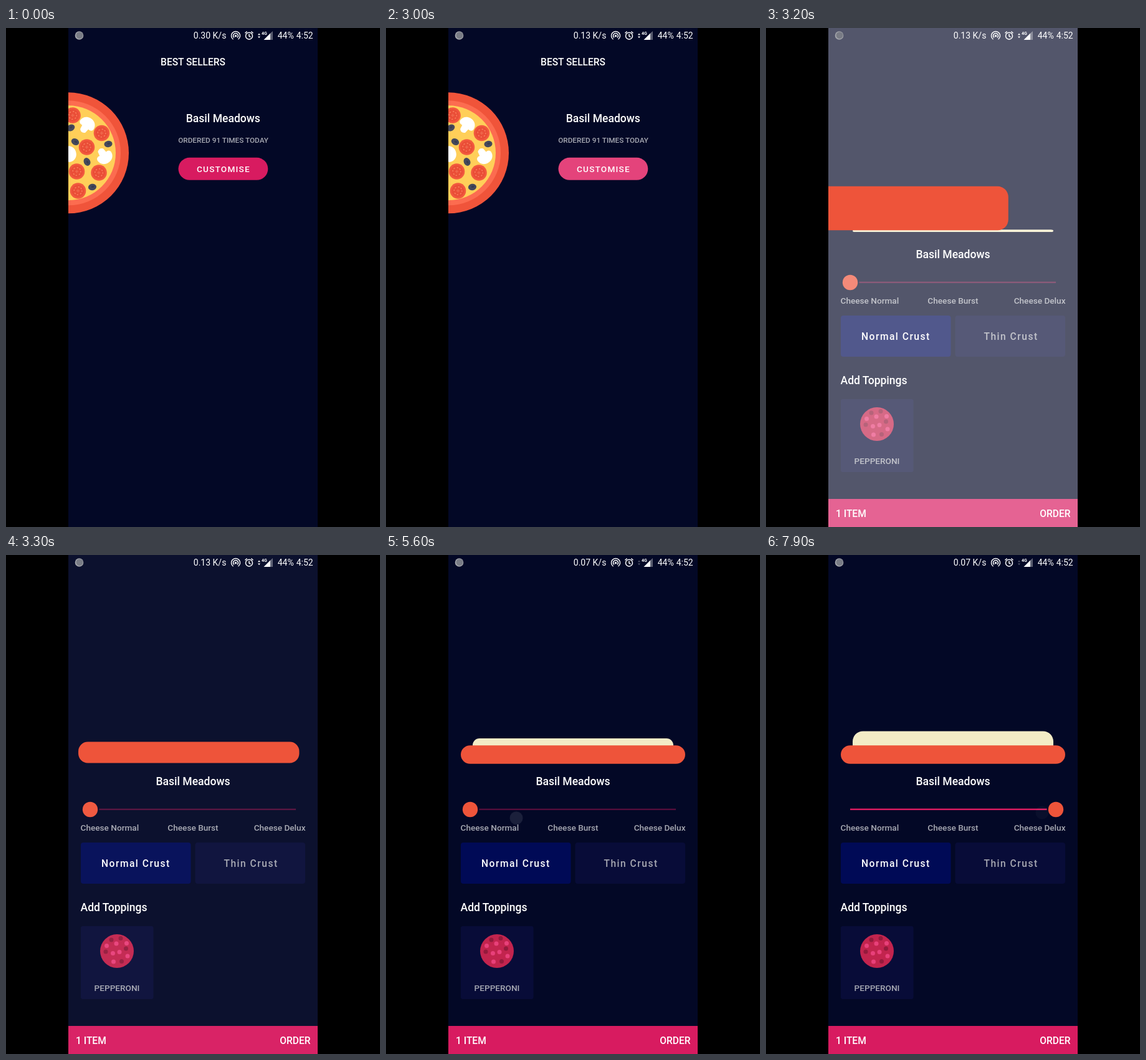
Animation, 600 px wide and 800 px high, one loop 8 s. Source, as an HTML page:

```html
<!DOCTYPE html>
<html lang="en">
<head>
<meta charset="utf-8">
<title>Pizza order</title>
<style>
html, body { margin: 0; width: 100%; height: 100%; overflow: hidden; background: #000; }
svg { display: block; }
text { font: 500 15.57px Roboto, sans-serif; fill: #fff; }
.status text { font-size: 14px; font-weight: 400; }
.status .net { font-size: 7px; font-weight: 700; }
.title { font-size: 17.52px; }
.small { font-size: 13.62px; }
.note { font-size: 11.8px; }
.dim { fill: #a6a8b2; }
.spaced { letter-spacing: 1.5px; }
.mid { text-anchor: middle; }
.end { text-anchor: end; }

.loop, .status .loop { animation: 8s linear infinite; }
.status .rate1 { animation-name: rate1; animation-timing-function: step-end; }
.status .rate2 { animation-name: rate2; animation-timing-function: step-end; }
.status .rate3 { animation-name: rate3; animation-timing-function: step-end; }
.status .arrows { animation-name: arrows; animation-timing-function: step-end; }
.list { animation-name: list; animation-timing-function: step-end; }
.detail { animation-name: detail; animation-timing-function: step-end; }
.press { animation-name: press; }
.scrim { animation-name: scrim; }
.cheese { animation-name: cheese; }
.active { animation-name: active; }
.knob { animation-name: knob; }
.touch { animation-name: touch; }
.crust { animation: crust 8s infinite, crustTop 8s infinite, detail 8s step-end infinite; }

@keyframes rate1 { 0% { opacity: 1 } 32.5%, 100% { opacity: 0 } }
@keyframes rate2 { 0% { opacity: 0 } 32.5% { opacity: 1 } 70%, 100% { opacity: 0 } }
@keyframes rate3 { 0% { opacity: 0 } 70%, 100% { opacity: 1 } }
@keyframes arrows { 0% { opacity: 1 } 20% { opacity: .3 } 32.5% { opacity: 1 } 70%, 100% { opacity: .3 } }

@keyframes list { 0% { opacity: 1 } 38.375%, 100% { opacity: 0 } }
@keyframes detail { 0% { opacity: 0 } 38.375%, 100% { opacity: 1 } }
@keyframes press { 0%, 35% { fill: #d81b60 } 36.875%, 100% { fill: #e4437b } }
@keyframes scrim {
  0%, 38.37% { opacity: 0 }
  38.375% { opacity: 1; animation-timing-function: cubic-bezier(.4, 0, .2, 1) }
  42.125%, 100% { opacity: 0 }
}

/* the round pizza box flattens into the side view of the crust */
@keyframes crust {
  0%, 38.375% { x: 3px; width: 194px; rx: 22px; animation-timing-function: cubic-bezier(.41, 0, .2, 1) }
  42.125%, 100% { x: 120px; width: 360px; rx: 15px }
}
@keyframes crustTop {
  0%, 38.375% { y: 99px; height: 194px; animation-timing-function: cubic-bezier(.34, .08, .16, 1) }
  42.125%, 100% { y: 305.3px; height: 29.4px }
}
@keyframes cheese {
  0%, 39.7% { y: 327px; height: 0; rx: 3px }
  42.5%, 70.625% { y: 294px; height: 33px; rx: 11px }
  74.375%, 95% { y: 287px; height: 40px; rx: 14px }
  98.75%, 100% { y: 282.5px; height: 44.5px; rx: 16.5px }
}

@keyframes active {
  0%, 70.625% { width: 0; animation-timing-function: ease-in-out }
  72.5%, 94.75% { width: 165px; animation-timing-function: ease-in-out }
  96.625%, 100% { width: 330px }
}
@keyframes knob {
  0%, 70.625% { transform: translateX(0); animation-timing-function: ease-in-out }
  72.5%, 94.75% { transform: translateX(165px); animation-timing-function: ease-in-out }
  96.625%, 100% { transform: translateX(330px) }
}
@keyframes touch {
  0%, 64.99% { opacity: 0; transform: translate(135px, 415px) }
  65% { opacity: .1; transform: translate(135px, 415px) }
  74.75% { opacity: .1; transform: translate(279px, 428px) }
  76.25% { opacity: 0; transform: translate(279px, 428px) }
  87.49% { opacity: 0; transform: translate(303px, 427px) }
  87.5% { opacity: .1; transform: translate(303px, 427px) }
  97.5% { opacity: .1; transform: translate(443px, 413px) }
  98.75%, 100% { opacity: .03; transform: translate(443px, 413px) }
}
</style>
</head>
<body>
<svg width="600" height="800" viewBox="0 0 600 800">
  <defs>
    <g id="tomato">
      <circle r="12.8" fill="#f2593f"/>
      <circle r="10" fill="#ea4e37"/>
      <g fill="none" stroke="#fb8260" stroke-width="1.5" stroke-linecap="round">
        <circle r="6.3" stroke-dasharray="1 3.4 1 4.5"/>
        <path d="M-2 0H2M0-2V2" stroke="#f0694e"/>
      </g>
    </g>
    <path id="mushroom" fill="#fff" d="M-13 1C-13-16 13-16 13 1Q12 6 6 5L5 12Q0 17-5 12L-6 5Q-12 6-13 1Z"/>
    <g id="olive">
      <ellipse rx="6.6" ry="5.2" fill="#45495c"/>
      <ellipse cx="1" cy="-.5" rx="2.6" ry="1.6" fill="#383c50"/>
    </g>
  </defs>

  <svg x="100" width="400" height="800" viewBox="100 0 400 800">
    <rect x="100" width="400" height="800" fill="#030826"/>

    <g class="loop list">
      <text class="mid" x="300" y="59.5">BEST SELLERS</text>
      <g>
        <circle cx="100" cy="200.3" r="97" fill="#f0543a"/>
        <circle cx="100" cy="200.3" r="84" fill="#fc6c50"/>
        <circle cx="100" cy="200.3" r="76" fill="#ffcf59"/>
        <use href="#tomato" x="107" y="140"/>
        <use href="#tomato" x="153.500" y="168.500"/>
        <use href="#tomato" x="129.500" y="191"/>
        <use href="#tomato" x="113.500" y="230"/>
        <use href="#tomato" x="149" y="232"/>
        <use href="#tomato" x="115.500" y="261"/>
        <use href="#mushroom" transform="translate(130 155) rotate(35)"/>
        <use href="#mushroom" transform="translate(158 206) rotate(148)"/>
        <use href="#mushroom" transform="translate(101 202) rotate(80)"/>
        <use href="#olive" transform="translate(104 160) rotate(-30)"/>
        <use href="#olive" transform="translate(164 186) rotate(-12)"/>
        <use href="#olive" transform="translate(111 182.500) rotate(30)"/>
        <use href="#olive" transform="translate(130 214.500) rotate(65)"/>
        <use href="#olive" transform="translate(138.500 255) rotate(-8)"/>
      </g>
      <text class="title mid" x="348.300" y="151">Basil Meadows</text>
      <text class="note mid dim" x="348.500" y="184">ORDERED 91 TIMES TODAY</text>
      <rect class="loop press" x="276.500" y="207.800" width="143.800" height="36" rx="18"/>
      <text class="small" x="306" y="231" letter-spacing="1.2">CUSTOMISE</text>
    </g>

    <g class="loop detail">
      <rect class="loop cheese" x="139" width="322" fill="#f3ecc6"/>
      <text class="title mid" x="300" y="369">Basil Meadows</text>

      <rect x="135" y="406.600" width="330" height="2.400" fill="#d81b60" opacity=".38"/>
      <rect class="loop active" x="135" y="406.600" height="2.400" fill="#d81b60"/>
      <g class="loop knob">
        <circle cx="135" cy="408" r="14.500" fill="#030826"/>
        <circle cx="135" cy="408" r="12.200" fill="#ee543a"/>
      </g>
      <text class="small dim" x="119.500" y="441.500">Cheese Normal</text>
      <text class="small dim mid" x="300" y="441.500">Cheese Burst</text>
      <text class="small dim end" x="480.500" y="441.500">Cheese Delux</text>

      <rect x="120" y="461" width="176.500" height="66" rx="4" fill="#000a56"/>
      <rect x="303.500" y="461" width="176.500" height="66" rx="4" fill="#080c38"/>
      <text class="spaced" x="153" y="500">Normal Crust</text>
      <text class="spaced dim" x="349.500" y="500">Thin Crust</text>

      <text class="title" x="119.500" y="571">Add Toppings</text>
      <rect x="120" y="595" width="116.500" height="117" rx="3" fill="#080c38"/>
      <circle cx="178" cy="635" r="27" fill="#c2244e"/>
      <path fill="none" stroke="#941a3c" stroke-width="7" stroke-linecap="round"
        d="M169 617h0M184 614.500h0M192.500 631h0M160 636h0M185.500 651.500h0"/>
      <path fill="none" stroke="#e8407a" stroke-width="7" stroke-linecap="round"
        d="M161.500 626.500h0M177 623h0M193.500 622.500h0M171.500 638.500h0M182 636.500h0M195 643h0M172.500 652h0"/>
      <text class="small dim mid" x="178" y="698.500">PEPPERONI</text>

      <rect x="100" y="755" width="400" height="45" fill="#d81b60"/>
      <text x="112" y="784">1 ITEM</text>
      <text class="end" x="488.500" y="784">ORDER</text>
    </g>

    <rect class="loop scrim" x="100" width="400" height="800" fill="#fff"/>
    <rect class="crust" fill="#ee543a"/>
    <circle class="loop touch" r="10.500" fill="#fff"/>

    <g class="status">
      <circle cx="117.500" cy="12" r="6.800" fill="#a3a5ab"/>
      <circle cx="118" cy="11.700" r="5.500" fill="#797c85"/>
      <text class="loop rate1" x="300.800" y="17.300">0.30 K/s</text>
      <text class="loop rate2" x="300.800" y="17.300">0.13 K/s</text>
      <text class="loop rate3" x="300.800" y="17.300">0.07 K/s</text>
      <g fill="none" stroke="#fff" stroke-width="1.500">
        <path d="M364.500 18.200A7 7 0 1 1 372.500 18.200M366 15.500A4 4 0 1 1 371 15.500"/>
        <circle cx="390" cy="12.700" r="5.500"/>
        <path d="M390 9.500V13l2.500 1.700M383.500 8.200l3.200-2.700M396.500 8.200l-3.200-2.700"/>
      </g>
      <circle cx="368.500" cy="12.800" r="1.800" fill="#fff"/>
      <path class="loop arrows" fill="#fff" d="M404 11.200l2-2.700 2 2.700zM404 13.500l2 2.700 2-2.700z"/>
      <path fill="#fff" d="M413.500 19L424 8.500V19z"/>
      <path fill="#fff" opacity=".35" d="M424 8.500L428 5V19H424z"/>
      <text class="net" x="410" y="11">4G</text>
      <text x="435.700" y="17.300">44%</text>
      <text x="465.700" y="17.300">4:52</text>
    </g>
  </svg>
</svg>
</body>
</html>
```
